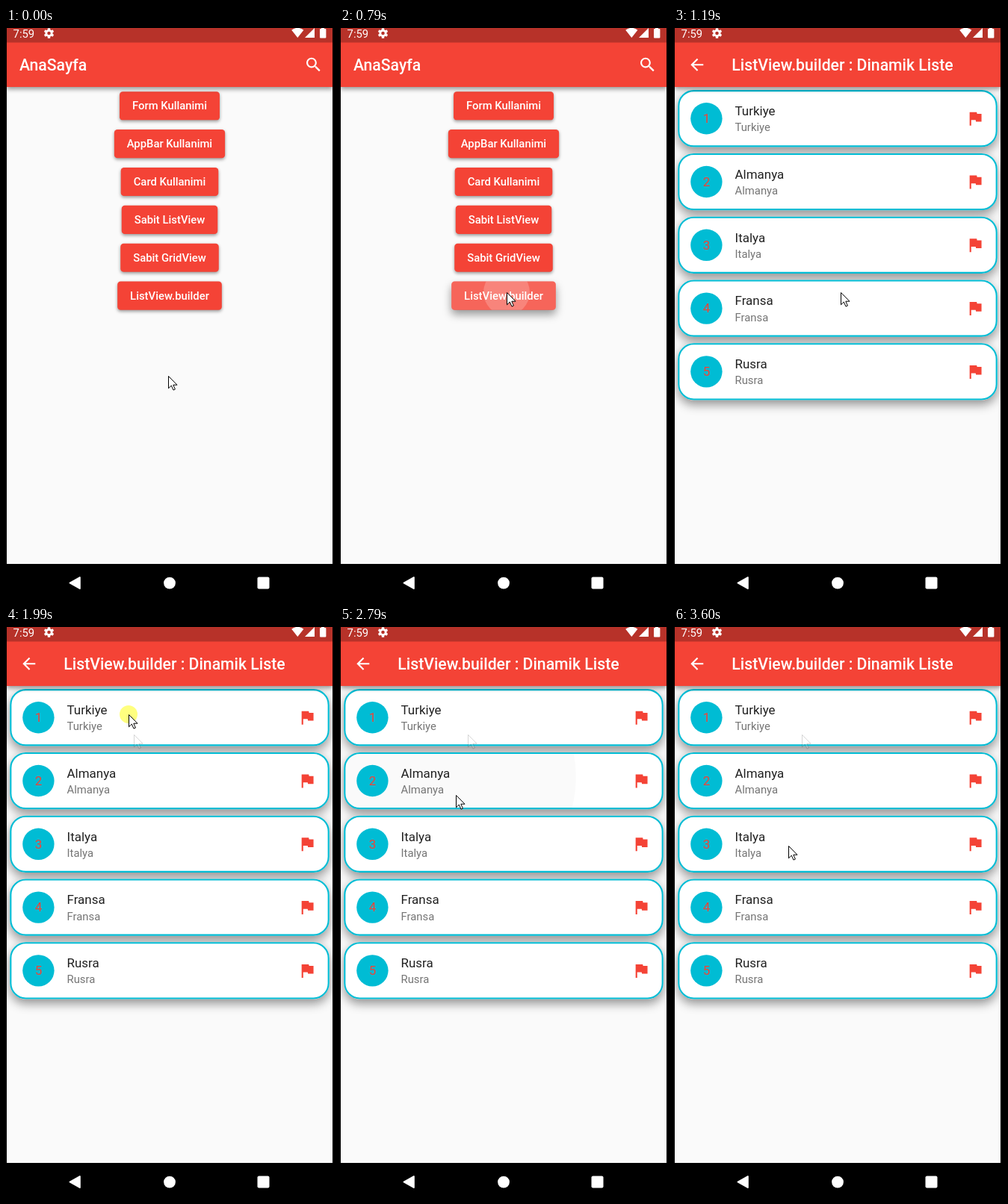
Write an HTML page with a canvas that moves like this. It is 439 px wide and 765 px high and loops after 4 s.

```html
<!DOCTYPE html>
<html lang="tr">
<head>
<meta charset="utf-8">
<title>Dinamik Liste</title>
<style>
  html, body { margin: 0; width: 100%; height: 100%; overflow: hidden; background: #000; }
  canvas { display: block; }
</style>
</head>
<body>
<canvas id="stage" width="439" height="765"></canvas>
<script>
const ctx = document.getElementById('stage').getContext('2d');
const LOOP = 4000;
const U = 436 / 411.43;               // one layout unit in pixels
const LEFT = 1, RIGHT = 437, BOTTOM = 718, TOP = -6;
const BAR_BOTTOM = 79, BAR_MID = 49.2;
const RED = '#f44336', CYAN = '#00bcd4', PAGE = '#fafafa';

const BUTTONS = ['Form Kullanimi', 'AppBar Kullanimi', 'Card Kullanimi',
  'Sabit ListView', 'Sabit GridView', 'ListView.builder'];
const COUNTRIES = ['Turkiye', 'Almanya', 'Italya', 'Fransa', 'Rusra'];

// Pointer positions: start time, x, y
const POINTER = [
  [0, 217, 466], [200, 225, 392], [390, 223, 354], [1590, 210, 273],
  [1790, 171, 144], [1990, 164, 117], [2190, 164, 130], [2390, 158, 199],
  [2590, 157, 201], [2790, 155, 225], [2990, 153, 287], [3200, 153, 293]
];

const ICONS = {
  back: 'M20 11H7.83l5.59-5.59L12 4l-8 8 8 8 1.41-1.41L7.83 13H20z',
  search: 'M15.5 14h-.79l-.28-.27C15.41 12.59 16 11.11 16 9.5 16 5.91 13.09 3 9.5 3S3 5.91 3 9.5 5.91 16 9.5 16c1.61 0 3.09-.59 4.23-1.57l.27.28v.79l5 4.99L20.49 19zm-6 0C7.01 14 5 11.99 5 9.5S7.01 5 9.5 5 14 7.01 14 9.5 11.99 14 9.5 14z',
  flag: 'M14.4 6L14 4H5v17h2v-7h5.6l.4 2h7V6z'
};
for (const name in ICONS) ICONS[name] = new Path2D(ICONS[name]);

const ARROW = new Path2D('M.5 .5V16.8L4.3 13.1L7 19.1L9.4 18L6.8 12.2H12Z');

function rect(x, y, w, h, color) {
  ctx.fillStyle = color;
  ctx.fillRect(x, y, w, h);
}

function circle(x, y, r, color) {
  ctx.fillStyle = color;
  ctx.beginPath();
  ctx.arc(x, y, r, 0, Math.PI * 2);
  ctx.fill();
}

function polygon(points, color) {
  ctx.fillStyle = color;
  ctx.beginPath();
  points.forEach(([x, y]) => ctx.lineTo(x, y));
  ctx.closePath();
  ctx.fill();
}

function roundPath(x, y, w, h, r) {
  const path = new Path2D();
  path.roundRect(x, y, w, h, r);
  return path;
}

function text(str, x, y, size, color, weight = 400, align = 'left') {
  ctx.font = `${weight} ${size}px Roboto, sans-serif`;
  ctx.textAlign = align;
  ctx.fillStyle = color;
  ctx.fillText(str, x, y);
}

function icon(path, cx, cy, color) {
  ctx.save();
  ctx.translate(cx, cy);
  ctx.scale(U, U);
  ctx.translate(-12, -12);
  ctx.fillStyle = color;
  ctx.fill(path);
  ctx.restore();
}

function shadowed(path, color, blur, dy, alpha) {
  ctx.save();
  ctx.shadowColor = `rgba(0,0,0,${alpha})`;
  ctx.shadowBlur = blur;
  ctx.shadowOffsetY = dy;
  ctx.fillStyle = color;
  ctx.fill(path);
  ctx.restore();
}

function inside(path, draw) {
  ctx.save();
  ctx.clip(path);
  draw();
  ctx.restore();
}

function appBar(title, x) {
  const bar = new Path2D();
  bar.rect(LEFT, TOP, RIGHT - LEFT, BAR_BOTTOM - TOP);
  shadowed(bar, RED, 6, 2.5, 0.4);
  text(title, x, 56.5, 20 * U, '#fff', 500);
}

function button(label, i, pressed) {
  const size = 14 * U, h = 36 * U, mid = 104.3 + i * 48 * U;
  ctx.font = `500 ${size}px Roboto, sans-serif`;
  const w = ctx.measureText(label).width + 32 * U;
  const shape = roundPath(219 - w / 2, mid - h / 2, w, h, 4 * U);
  if (pressed) {
    shadowed(shape, RED, 12, 6, 0.4);
    inside(shape, () => {
      rect(100, mid - h / 2, 240, h, 'rgba(255,255,255,.18)');
      circle(223, 354, 31, 'rgba(255,255,255,.2)');
    });
  } else {
    shadowed(shape, RED, 4, 2, 0.4);
  }
  text(label, 219, mid + size * 0.342, size, '#fff', 500, 'center');
}

function homePage(t) {
  rect(LEFT, 0, RIGHT - LEFT, BOTTOM, PAGE);
  BUTTONS.forEach((label, i) => button(label, i, i === 5 && t >= 790));
  appBar('AnaSayfa', 17.9);
  icon(ICONS.search, 411.6, BAR_MID, '#fff');
}

function splash(t, i) {
  if (i === 0 && t >= 2190 && t < 2390) circle(164, 117, 17.5, 'rgba(0,0,0,.06)');
  if (i === 1 && t >= 2790 && t < 2990) circle(157, 201, 159, 'rgba(0,0,0,.02)');
  if (i === 2 && t >= 3400 && t < 3600) circle(153, 293, 195, 'rgba(0,0,0,.02)');
}

function card(name, i, t) {
  const x = LEFT + 4 * U, y = 83.1 + i * 80 * U;
  const w = RIGHT - LEFT - 8 * U, h = 72 * U, mid = y + h / 2;
  const shape = roundPath(x, y, w, h, 20 * U);
  shadowed(shape, '#fff', 14, 6, 0.42);
  inside(shape, () => splash(t, i));

  ctx.strokeStyle = CYAN;
  ctx.lineWidth = 2 * U;
  ctx.stroke(roundPath(x + U, y + U, w - 2 * U, h - 2 * U, 19 * U));

  circle(x + 36 * U, mid, 20 * U, CYAN);
  text(i + 1, x + 36 * U, mid + 5.8, 16 * U, RED, 400, 'center');
  text(name, x + 72 * U, y + 32 * U, 16 * U, '#212121');
  text(name, x + 72 * U, y + 52 * U, 14 * U, '#757575');
  icon(ICONS.flag, x + w - 28 * U, mid, RED);
}

function listPage(t) {
  rect(LEFT, TOP, RIGHT - LEFT, BOTTOM - TOP, PAGE);
  COUNTRIES.forEach((name, i) => card(name, i, t));
  appBar('ListView.builder : Dinamik Liste', 77.3);
  icon(ICONS.back, 30.8, BAR_MID, '#fff');
}

function zoomedListPage(t) {
  homePage(0);
  rect(LEFT, 0, RIGHT - LEFT, BOTTOM, 'rgba(0,0,0,.5)');
  ctx.save();
  ctx.translate(219, 356);
  ctx.scale(0.992, 0.992);
  ctx.translate(-219, -356);
  const frame = new Path2D();
  frame.rect(LEFT, TOP, RIGHT - LEFT, BOTTOM - TOP);
  inside(frame, () => listPage(t));
  ctx.restore();
}

function gear(x, y) {
  ctx.save();
  ctx.translate(x, y);
  ctx.fillStyle = '#fff';
  for (let i = 0; i < 6; i++) {
    ctx.fillRect(-1.7, -6.7, 3.4, 4);
    ctx.rotate(Math.PI / 3);
  }
  ctx.strokeStyle = '#fff';
  ctx.lineWidth = 2.8;
  ctx.beginPath();
  ctx.arc(0, 0, 3.7, 0, Math.PI * 2);
  ctx.stroke();
  ctx.restore();
}

function statusBar() {
  rect(LEFT, 0, RIGHT - LEFT, 19.5, 'rgba(0,0,0,.25)');
  text('7:59', 9.6, 12.6, 14.8, '#fff');
  gear(57.5, 7);

  ctx.fillStyle = '#fff';
  ctx.beginPath();
  ctx.moveTo(390.3, 13);
  ctx.lineTo(382.2, 2.8);
  ctx.quadraticCurveTo(390.3, -3.2, 398.4, 2.8);
  ctx.fill();
  polygon([[400, 13], [413, 13], [413, 0]], '#fff');
  rect(422, 0, 4, 2, '#fff');
  ctx.fillStyle = '#fff';
  ctx.fill(roundPath(420, 1, 8.4, 12.4, 1));
}

function navBar() {
  rect(0, BOTTOM, 439, 765 - BOTTOM, '#000');
  polygon([[85, 743.5], [99, 736], [99, 751]], '#fff');
  ctx.strokeStyle = '#fff';
  ctx.lineWidth = 2;
  ctx.lineJoin = 'round';
  ctx.stroke(new Path2D('M85.5 743.5L98.8 736V751Z'));
  circle(219, 743.6, 7.9, '#fff');
  ctx.fillStyle = '#fff';
  ctx.fill(roundPath(336.5, 735.5, 16, 16, 2));
}

function arrow(x, y, alpha = 1) {
  ctx.save();
  ctx.globalAlpha = alpha;
  ctx.translate(x, y);
  ctx.fillStyle = '#fff';
  ctx.fill(ARROW);
  ctx.strokeStyle = '#000';
  ctx.lineWidth = 1;
  ctx.lineJoin = 'miter';
  ctx.stroke(ARROW);
  ctx.restore();
}

function pointer(t) {
  const [, x, y] = POINTER.filter(step => step[0] <= t).pop();
  if (t >= 1990) arrow(171, 144, 0.16);
  const clicked = (t >= 590 && t < 790) || (t >= 1990 && t < 2190);
  if (clicked) circle(x, y, 12, 'rgba(255,255,0,.5)');
  arrow(x, y);
}

function render(t) {
  rect(0, 0, 439, 765, '#000');
  const screen = new Path2D();
  screen.rect(LEFT, 0, RIGHT - LEFT, BOTTOM);
  inside(screen, () => {
    if (t < 990) homePage(t);
    else if (t < 1190) zoomedListPage(t);
    else listPage(t);
    statusBar();
  });
  navBar();
  pointer(t);
}

const start = performance.now();
function tick() {
  render((performance.now() - start) % LOOP);
  requestAnimationFrame(tick);
}
tick();
</script>
</body>
</html>
```
